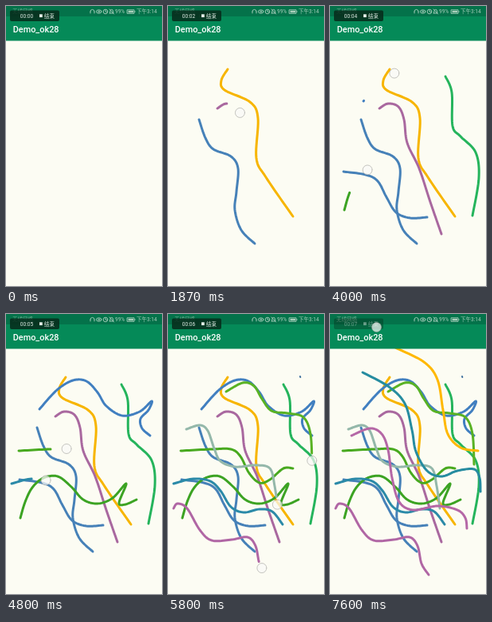
An HTML page with a canvas that plays this animation: 196x350 px, repeating every 7.67 s.

```html
<!DOCTYPE html>
<html lang="zh">
<head>
<meta charset="utf-8">
<title>Drawing demo</title>
<style>
  html, body { margin: 0; width: 100%; height: 100%; overflow: hidden; background: #fcfcf3; }
  canvas { display: block; width: 196px; height: 350px; }
</style>
</head>
<body>
<canvas id="stage" width="196" height="350"></canvas>
<script>
const ctx = document.getElementById('stage').getContext('2d');
const LOOP = 7670, STEP = 1000 / 15;
const SANS = 'Roboto, "Noto Sans CJK SC", "Noto Sans CJK", sans-serif';
const strokes = [];

// Catmull-Rom curve through the points, sampled with running length
function curve(p) {
  const n = p.length / 2, out = [];
  const at = (i, k) => p[2 * Math.max(0, Math.min(n - 1, i)) + k];
  let len = 0;
  for (let i = 0; i < n - 1; i++) {
    for (let s = i ? 1 : 0; s <= 12; s++) {
      const u = s / 12;
      const [x, y] = [0, 1].map(k => {
        const a = at(i - 1, k), b = at(i, k), c = at(i + 1, k), d = at(i + 2, k);
        return b + u / 2 * (c - a + u * (2 * a - 5 * b + 4 * c - d + u * (3 * b - a - 3 * c + d)));
      });
      const last = out[out.length - 1];
      if (last) len += Math.hypot(x - last.x, y - last.y);
      out.push({ x, y, len });
    }
  }
  return out;
}

function stroke(color, start, end, lag, ...points) {
  strokes.push({ color, start, end, lag, path: curve(points) });
}

stroke('#f7b500', 170, 770, 66, 75,79, 67,93, 71,105, 103,120, 113,140, 111,190, 123,214, 157,263);
stroke('#4681b8', 960, 1570, 66, 39,142, 47,165, 57,179, 79,188, 88,203, 86,232, 84,255, 92,280, 109,297);
stroke('#a9689f', 1760, 2350, 66, 62,128, 73,122, 86,126, 93,142, 97,171, 112,203, 126,245, 140,285);
stroke('#4681b8', 2487, 3085, 66, 17,207, 45,211, 60,219, 71,239, 83,258, 101,265, 122,264);
stroke('#25b45c', 3310, 3800, 66, 145,88, 153,108, 154,150, 164,163, 183,183, 187,215, 179,262);
stroke('#417fc0', 3860, 4480, 138, 42,119, 64,95, 84,83, 101,84, 115,98, 126,115, 146,127, 168,122,
  183,109, 179,120, 169,131, 171,143, 181,152);
stroke('#3ca323', 3855, 4430, 90, 18,255, 24,235, 33,217, 47,205, 65,203, 82,216, 97,232, 115,237,
  134,230, 151,212, 142,236, 150,238, 164,232);
stroke('#48a91f', 4600, 5160, 67, 16,171, 55,169, 79,169, 91,178, 102,199, 115,211, 128,207, 145,193, 157,193);
stroke('#2b8aa8', 4650, 5210, 62, 7,212, 32,206, 53,209, 66,221, 79,241, 95,248, 115,244, 131,247, 144,263);
stroke('#59b224', 5240, 5815, 30, 73,97, 94,86, 108,90, 118,106, 130,121, 150,124, 170,129, 179,150, 181,188);
stroke('#94b8aa', 5240, 5815, 30, 23,144, 40,139, 50,146, 58,168, 66,184, 85,191, 110,189, 128,193, 134,215, 138,243);
stroke('#b066a4', 5250, 5835, 30, 7,243, 12,237, 24,243, 40,270, 55,283, 80,282, 100,279, 110,290, 115,312, 124,326);
stroke('#3d6e9c', 5590, 5650, 0, 166,78, 166.3,79);
stroke('#268ca0', 5980, 6570, 60, 41,73, 74,91, 94,112, 103,145, 108,172, 122,196, 140,203, 160,196, 181,194, 188,205, 189,222);
stroke('#ffb800', 6000, 6590, 60, 82,42, 118,60, 135,82, 142,120, 148,150, 164,167, 186,171);
stroke('#b567a6', 5990, 6580, 60, 27,152, 50,143, 65,150, 73,170, 78,205, 87,235, 105,245, 135,240, 160,245, 170,255, 172,268);

const progress = (s, t) => Math.max(0, Math.min(1, (t - s.start) / (s.end - s.start)));

function pointAt(path, u) {
  const d = u * path[path.length - 1].len;
  const i = Math.max(1, path.findIndex(q => q.len >= d - 1e-6));
  const a = path[i - 1], b = path[i], f = (d - a.len) / (b.len - a.len || 1);
  return { x: a.x + (b.x - a.x) * f, y: a.y + (b.y - a.y) * f, i };
}

function drawStroke(s, t) {
  const u = progress(s, t - s.lag);
  if (!u) return;
  const tip = pointAt(s.path, u);
  ctx.strokeStyle = s.color;
  ctx.lineWidth = s.path.length < 20 ? 2 : 3;
  ctx.beginPath();
  for (let k = 0; k < tip.i; k++) ctx.lineTo(s.path[k].x, s.path[k].y);
  ctx.lineTo(tip.x, tip.y);
  ctx.stroke();
}

function touch(x, y) {
  ctx.beginPath();
  ctx.arc(x, y, 6, 0, 7);
  ctx.fillStyle = 'rgba(250,250,247,.72)';
  ctx.fill();
  ctx.lineWidth = 0.9;
  ctx.strokeStyle = 'rgba(150,150,145,.6)';
  ctx.stroke();
}

function text(str, x, y, size, color, weight = 400) {
  ctx.font = `${weight} ${size}px ${SANS}`;
  ctx.fillStyle = color;
  ctx.fillText(str, x, y);
}

function rect(x, y, w, h, color) {
  ctx.fillStyle = color;
  ctx.fillRect(x, y, w, h);
}

function statusIcons(color) {
  ctx.strokeStyle = color;
  ctx.lineWidth = 0.9;
  ctx.beginPath();
  // headset
  ctx.arc(108.5, 7, 2.6, Math.PI, 0);
  ctx.moveTo(106, 7); ctx.lineTo(106, 9);
  ctx.moveTo(111, 7); ctx.lineTo(111, 9);
  // eye
  ctx.moveTo(120, 7); ctx.ellipse(116.7, 7, 3.3, 2.2, 0, 0, 7);
  ctx.moveTo(117.7, 7); ctx.arc(116.7, 7, 1, 0, 7);
  // alarm clock
  ctx.moveTo(127.8, 7); ctx.arc(125, 7, 2.8, 0, 7);
  ctx.moveTo(125, 5.3); ctx.lineTo(125, 7); ctx.lineTo(126.4, 7.6);
  // muted bell
  ctx.moveTo(130.3, 9); ctx.lineTo(135, 9); ctx.lineTo(134.3, 6); ctx.arc(132.7, 6, 1.6, 0, Math.PI, true); ctx.lineTo(130.3, 9);
  ctx.moveTo(130, 4); ctx.lineTo(135.5, 10);
  // battery
  ctx.rect(152.5, 4.8, 8.5, 4.5);
  ctx.stroke();
  rect(153.5, 5.8, 6.5, 2.5, color);
  rect(161.4, 6, 0.9, 2, color);
}

function recorder(t) {
  ctx.globalAlpha = 1 - 0.55 * Math.max(0, Math.min(1, (t - 7400) / 180));
  ctx.beginPath();
  ctx.roundRect(5, 5.5, 62, 13.5, 2);
  ctx.fillStyle = 'rgba(6,44,27,.86)';
  ctx.fill();
  const sec = Math.floor((t + 330) / 1000);
  text('00:0' + sec, 17.8, 14.9, 6.6, '#e4efe8');
  rect(42, 10.3, 3.8, 3.8, '#e4efe8');
  text('结束', 48, 14.8, 6.4, '#e4efe8');
  ctx.globalAlpha = 1;
}

function draw(t) {
  const pale = '#a9cfbb';
  rect(0, 0, 196, 350, '#fcfcf3');
  ctx.lineCap = ctx.lineJoin = 'round';
  strokes.forEach(s => drawStroke(s, t));

  rect(0, 0, 196, 43.5, '#058a58');
  rect(0, 0, 196, 13, '#04724a');
  text('无线网络', 8, 9.3, 6.5, '#7fb59b');
  statusIcons(pale);
  text('99%', 137, 9.4, 6.5, pale);
  text('下午3:14', 164, 9.4, 6.5, pale);
  text('Demo_ok28', 8.7, 32.6, 10.9, '#fff', 500);
  recorder(t);

  for (const s of strokes) {
    if (t < s.start || t > s.end) continue;
    const p = pointAt(s.path, progress(s, t));
    touch(p.x, p.y);
  }
  if (t >= 7260) touch(58.5, 16.5);
}

const origin = performance.now();
function tick() {
  const t = Math.max(0, performance.now() - origin) % LOOP;
  draw(Math.floor((t + 1) / STEP) * STEP);
  requestAnimationFrame(tick);
}
tick();
</script>
</body>
</html>
```
